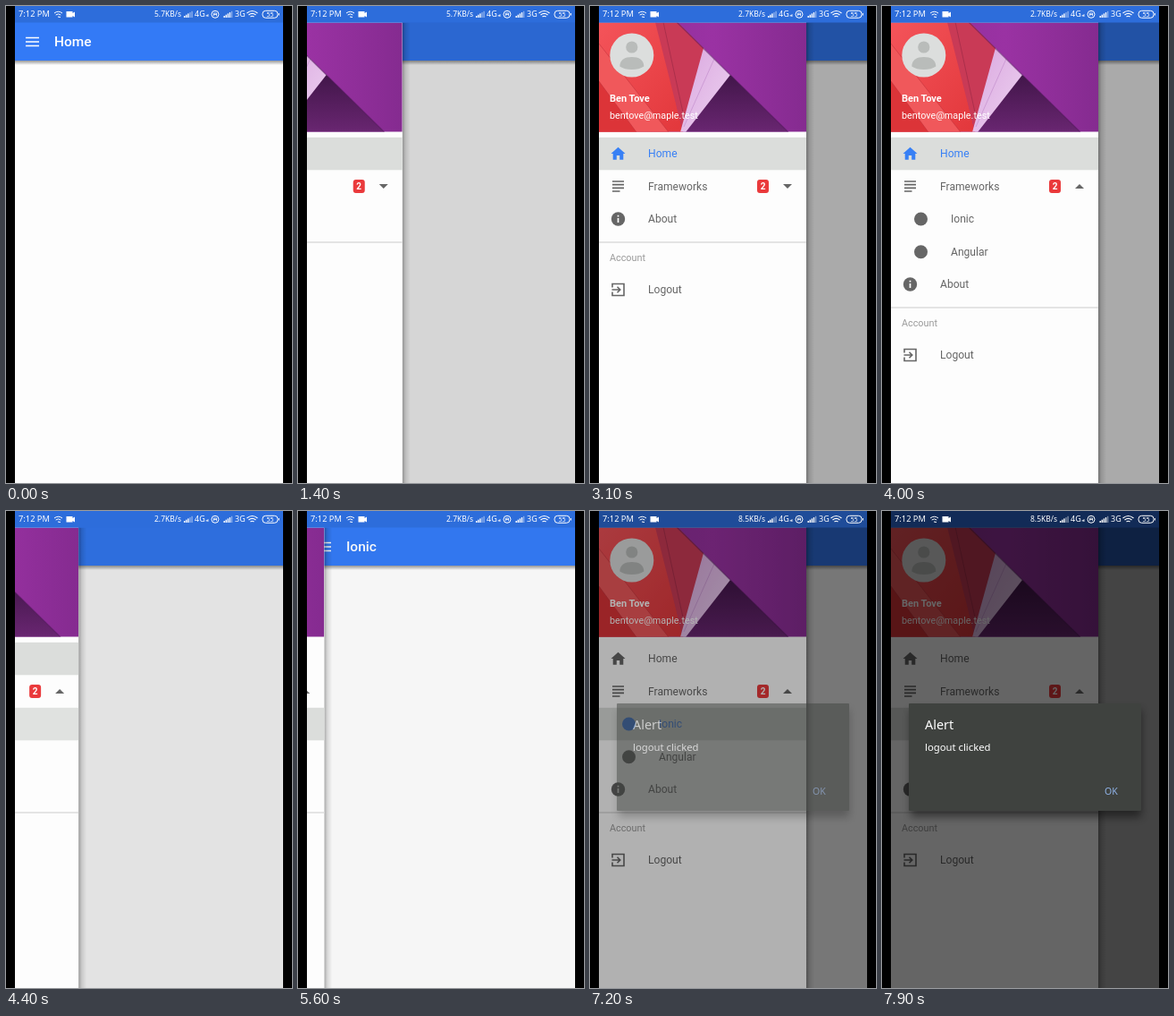
Recreate the animation shown at these times as an HTML page. Size 320 by 533 pixels, loop 8 s.

```html
<!DOCTYPE html>
<html lang="en">
<head>
<meta charset="utf-8">
<title>Side menu</title>
<style>
html, body { margin: 0; width: 100%; height: 100%; overflow: hidden; background: #000; }
svg { display: block; width: 100vw; height: 100vh; }
text { font-family: Roboto, "Noto Sans", sans-serif; white-space: pre; }
.sys text { font-family: "Noto Sans", "Open Sans", sans-serif; }
.row { fill: #666; font-size: 12.1px; }
.row.on { fill: #3880f5; }
</style>
</head>
<body>
<svg viewBox="0 0 320 533">
  <defs>
    <clipPath id="screen"><rect x="10" width="300" height="533"/></clipPath>
    <clipPath id="below"><rect x="10" y="18.5" width="300" height="515"/></clipPath>
    <clipPath id="cover"><rect x="10" y="18.5" width="232" height="122"/></clipPath>
    <linearGradient id="fall" x2="0" y2="1">
      <stop stop-opacity=".4"/><stop offset="1" stop-opacity="0"/>
    </linearGradient>
    <linearGradient id="edge">
      <stop stop-opacity=".32"/><stop offset=".4" stop-opacity=".12"/><stop offset="1" stop-opacity="0"/>
    </linearGradient>
    <linearGradient id="violet"><stop stop-color="#8c2f98"/><stop offset=".55" stop-color="#9a32a3"/><stop offset="1" stop-color="#852b90"/></linearGradient>
    <linearGradient id="plum" x2="0" y2="1"><stop stop-color="#42164a"/><stop offset="1" stop-color="#692671"/></linearGradient>
    <linearGradient id="lilac" x2="1" y2="1"><stop stop-color="#d9a6de"/><stop offset="1" stop-color="#eed3f2"/></linearGradient>
    <linearGradient id="red" x2="1" y2="1"><stop stop-color="#f4545a"/><stop offset="1" stop-color="#e2373b"/></linearGradient>
    <filter id="soft" x="-20%" y="-20%" width="140%" height="150%"><feGaussianBlur stdDeviation="5"/></filter>
  </defs>

  <rect width="320" height="533"/>
  <g clip-path="url(#screen)">
    <rect x="10" width="300" height="533" fill="#fdfdfd"/>
    <rect x="10" y="18" width="300" height="43" fill="#337af6"/>
    <rect x="10" y="61" width="300" height="5" fill="url(#fall)"/>
    <path d="M22 35.5h15M22 40h15M22 44.5h15" stroke="#fff" stroke-width="1.7"/>
    <text id="title" x="54" y="45" fill="#fff" font-size="15.5" font-weight="500"></text>
    <rect id="shade" x="10" y="18" width="300" height="515"/>
    <g clip-path="url(#below)"><g id="drawer">
      <rect x="242" y="18" width="9" height="515" fill="url(#edge)"/>
      <rect x="10" y="18" width="232" height="515" fill="#fdfdfd"/>
      <g clip-path="url(#cover)">
        <rect x="10" y="18" width="232" height="123" fill="url(#violet)"/>
        <path d="M10 18H75L104 141H10z" fill="url(#red)"/>
        <path d="M10 42L88 141H10z" fill="#f0585b"/>
        <path d="M10 84L52 141H10z" fill="#dc3438"/>
        <path d="M10 42L88 141M10 84L52 141" stroke="#b62a35" stroke-opacity=".45"/>
        <path d="M73 18H98L128 48L104 141z" fill="#c93a56"/>
        <path d="M82 18L106 128" stroke="#8d2440" stroke-opacity=".5"/>
        <path d="M127 47L158 78L109 141H101z" fill="url(#lilac)"/>
        <path d="M139 59L105 135" stroke="#b77fc4" stroke-opacity=".5"/>
        <path d="M157 77L222 141H107z" fill="url(#plum)"/>
        <path d="M97 18L222 141" stroke="#4f1759" stroke-opacity=".5" stroke-width="1.2"/>
      </g>
      <circle cx="46.8" cy="55" r="24.5" fill="#dcdedd"/>
      <g fill="#b9bcba"><circle cx="46.8" cy="46" r="6.6"/><path d="M33.3 67.5C33.3 60 39 57 46.8 57S60.3 60 60.3 67.5Q55 71 46.8 71T33.3 67.5z"/></g>
      <text x="22" y="107" fill="#fff" font-size="11" font-weight="700">Ben Tove</text>
      <text x="22" y="125.500" fill="#fff" font-size="10.8">bentove@maple.test</text>
      <g id="rows"></g>
      <g id="badge">
        <rect x="187" y="194" width="13" height="15" rx="3" fill="#ea3a3c"/>
        <text x="193.5" y="205" fill="#fff" font-size="10" font-weight="700" text-anchor="middle">2</text>
        <path id="caret" fill="#666"/>
      </g>
      <g id="account">
        <path d="M10 264H242" stroke="#dcdddc" stroke-width="1.6"/>
        <text x="22" y="285" fill="#999" font-size="10.8">Account</text>
      </g>
    </g></g>

    <rect x="10" width="300" height="18.500" fill="#2d6ddb"/>
    <rect id="dim" x="10" width="300" height="533"/>
    <g class="sys" fill="#fff" font-size="9">
      <text x="14" y="12" font-size="9.3">7:12 PM</text>
      <text id="speed" x="166" y="12" font-size="8.5"></text>
      <text x="211" y="12">4G</text>
      <text x="256" y="12">3G</text>
      <path d="M67.500 6h7v2l2.500-1.500v6L74.500 11v1.500h-7z"/>
      <path d="M223 11l3.500-2v3z" opacity=".8"/>
      <g id="signals"></g>
      <g fill="none" stroke="#fff">
        <path d="M54 8q4.500-3.500 9 0M55.700 10q2.800-2.200 5.600 0M58 12l3 .5"/>
        <path d="M269.500 8q6-5 12 0M271.500 10q4-3.200 8 0M273.500 12q2-1.500 4 0" stroke-width="1.2"/>
        <circle cx="234" cy="9.300" r="4"/><path d="M232.500 11V8h3v3M232.500 9.500h3" stroke-width=".8"/>
        <rect x="287" y="5.300" width="17" height="8" rx="3.500"/><path d="M305.300 8v2.500"/>
      </g>
      <text x="295.500" y="12" font-size="7" text-anchor="middle">55</text>
    </g>
    <g id="alert" class="sys">
      <rect x="32" y="222" width="258" height="120" opacity=".45" filter="url(#soft)"/>
      <rect x="30" y="215" width="260" height="120" rx="1" fill="#3f423f"/>
      <text x="48" y="243.500" fill="#fff" font-size="14.4">Alert</text>
      <text x="48" y="268" fill="#fff" font-size="11.3">logout clicked</text>
      <text x="249" y="317" fill="#8fb2e6" font-size="10.500">OK</text>
    </g>
  </g>
</svg>
<script>
const LOOP = 8000, STEP = 100, WIDTH = 232, SUBMENU = 73;
const $ = id => document.getElementById(id);
const clamp = v => Math.max(0, Math.min(1, v));
const easeOut = u => 1 - (1 - clamp(u)) ** 3;
const smooth = u => (u = clamp(u)) * u * (3 - 2 * u);
const during = (t, from, to) => t >= from && t < to;

// Icons are drawn around their own centre.
const icons = {
  home: '<path d="M-1.700 6.700V2H1.700V6.700H5.800V0H8L0-7.200L-8 0H-5.800V6.700z"/>',
  list: '<path d="M-6.500-5.500h13M-6.500-1.800h13M-6.500 1.800h13M-6.500 5.500h8.500" stroke="currentColor" stroke-width="1.700"/>',
  circle: '<circle r="7.500"/>',
  info: '<circle r="7.700"/><path d="M0-4.200v1.700M0-1V4" stroke="#fdfdfd" stroke-width="1.700"/>',
  exit: '<path d="M-6.500-2.500V-6.500H6.500V6.500H-6.500V2.500M-7 0H2M-1-3.300L2.300 0L-1 3.300" fill="none" stroke="currentColor" stroke-width="1.600"/>'
};

const rows = {};
function addRow(name, icon, y, indent = 0) {
  $('rows').insertAdjacentHTML('beforeend', `<g class="row">
    <rect x="10" y="-18.200" width="232" height="36.500" fill="#dbdddb"/>
    <g transform="translate(${31.500 + indent})" color="#666">${icons[icon]}</g>
    <text x="${65 + indent}" y="4.300">${name}</text></g>`);
  const node = $('rows').lastElementChild;
  rows[name] = { node, y, back: node.firstElementChild };
}
addRow('Home', 'home', 165);
addRow('Frameworks', 'list', 201.5);
addRow('Ionic', 'circle', 238, 12);
addRow('Angular', 'circle', 274.7, 12);
addRow('About', 'info', 238);
addRow('Logout', 'exit', 317);

for (const [x, full] of [[199, 3], [243.5, 4]])
  for (let i = 0; i < 5; i++)
    $('signals').insertAdjacentHTML('beforeend',
      `<rect x="${x + i * 2.1}" y="${11 - i * 1.3}" width="1.4" height="${2 + i * 1.3}" opacity="${i < full ? 1 : 0.45}"/>`);

const moveY = (node, y) => node.setAttribute('transform', `translate(0 ${y})`);

function drawRow(name, shift, active, pressed) {
  const { node, y, back } = rows[name];
  moveY(node, y + shift);
  node.classList.toggle('on', active);
  back.setAttribute('opacity', active ? 1 : pressed ? 0.85 : 0);
}

function openness(t) {
  if (t < 4000) return easeOut((t - 1335) / 350);
  if (t < 5000) return 1 - smooth((t - 4242) / 250);
  return easeOut((t - 5590) / 350);
}

function render(t) {
  const open = openness(t);
  const expanded = t >= 3400;
  const shift = expanded ? SUBMENU : 0;
  const onIonic = t >= 4500;

  $('title').textContent = t < 4300 ? 'Home' : onIonic ? 'Ionic' : '';
  $('speed').textContent = (t < 2400 ? '5.7' : t < 7200 ? '2.7' : '8.5') + 'KB/s';
  $('shade').setAttribute('opacity', 0.33 * open);
  $('drawer').setAttribute('transform', `translate(${(open - 1) * WIDTH})`);
  $('drawer').style.display = open > 0 ? '' : 'none';

  drawRow('Home', 0, !onIonic, false);
  drawRow('Frameworks', 0, false, during(t, 3300, 3600));
  drawRow('Ionic', 0, onIonic, during(t, 4100, 4500));
  drawRow('Angular', 0, false, false);
  drawRow('About', shift, false, false);
  drawRow('Logout', shift, false, during(t, 6900, 7200));
  for (const name of ['Ionic', 'Angular'])
    rows[name].node.style.display = expanded ? '' : 'none';
  for (const { node } of Object.values(rows))
    node.children[1].setAttribute('color', node.classList.contains('on') ? '#3880f5' : '#666');
  $('caret').setAttribute('d', expanded ? 'M216 204h10l-5-5z' : 'M216 199h10l-5 5z');
  moveY($('account'), shift);

  const alert = clamp((t - 7100) / 200);
  $('dim').setAttribute('opacity', 0.6 * alert);
  $('alert').setAttribute('opacity', alert);
}

const start = performance.now();
function tick() {
  const t = (performance.now() - start) % LOOP;
  render(Math.floor(t / STEP) * STEP);
  requestAnimationFrame(tick);
}
tick();
</script>
</body>
</html>
```
